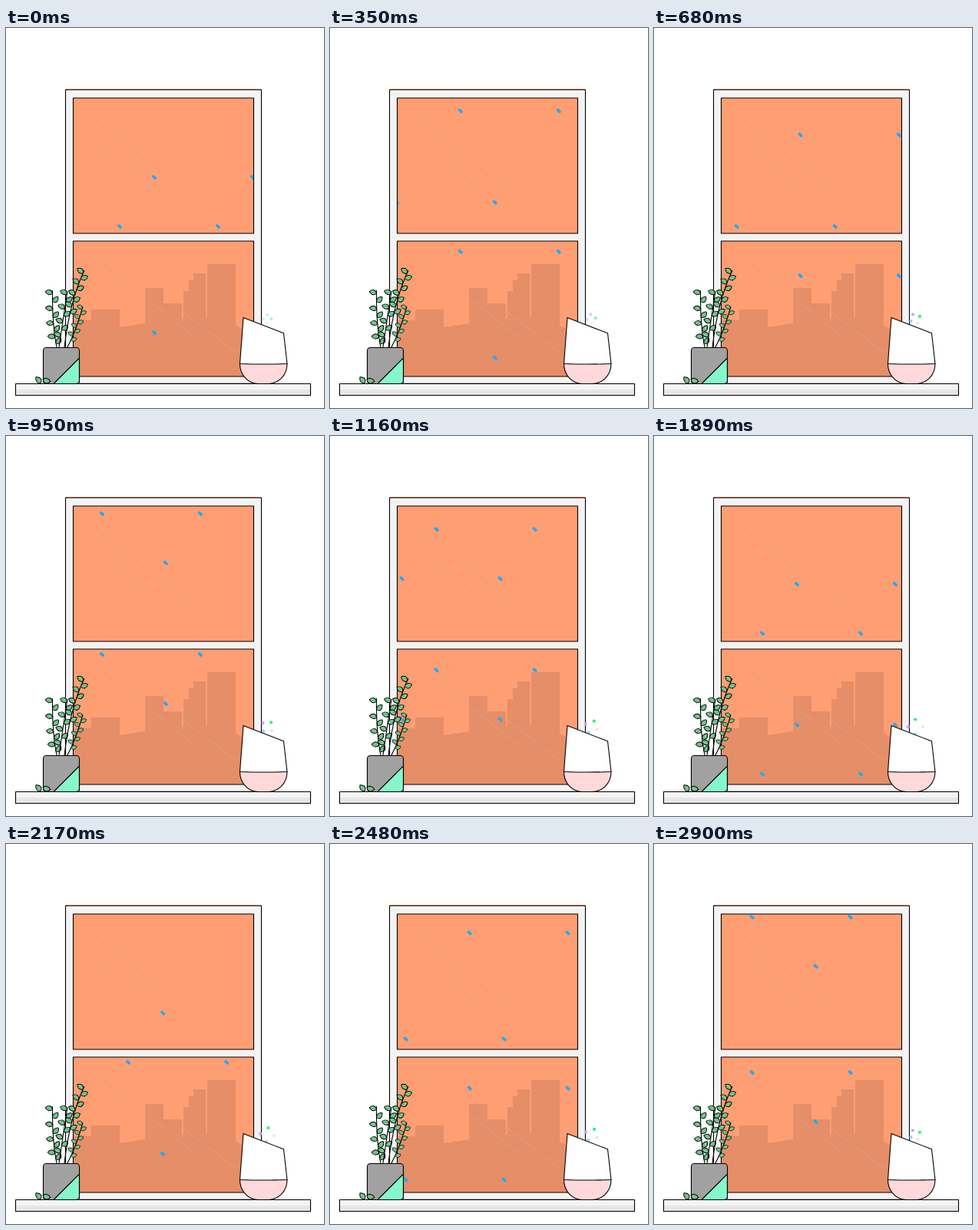
An HTML page that plays this animation: 414x494 px, repeating every 3 s.

```html
<!DOCTYPE html>
<html lang="en">
<head>
<meta charset="utf-8">
<title>Rainy window</title>
<style>
  html, body { margin: 0; width: 100%; height: 100%; overflow: hidden; background: #fff; }
  svg { display: block; width: 414px; height: 494px; }
  .line { stroke: #000; stroke-width: 1.1; stroke-linejoin: round; }
  .glass { fill: #ff9e73; }
  .hollow { fill: none; }
  .city { fill: #e58e68; }
  .shine { fill: none; stroke: #dca18d; stroke-width: 1; }
  .drop { stroke: #1eaaff; stroke-width: 3.7; stroke-linecap: round; }
  .stem { fill: none; stroke: #000; stroke-width: 1.1; }
  .leaf { fill: #72c58c; stroke: #000; stroke-width: 1; stroke-linejoin: round; }
</style>
</head>
<body>
<svg viewBox="0 0 414 494">
  <defs>
    <clipPath id="panes">
      <path d="M88 91.5H322.5V266.5H88ZM88 277.5H322.5V452.5H88Z"/>
    </clipPath>
    <path id="pane-shape" d="M87.5 91H322.5V267H87.5ZM87.5 277H322.5V453H87.5Z"/>
    <rect id="sill-shape" x="12.5" y="462.5" width="384" height="15"/>
    <rect id="pot-shape" x="48.5" y="415.5" width="47" height="47" rx="4"/>
  </defs>

  <rect class="glass" x="78" y="79" width="254" height="2"/>
  <rect class="line" x="77.5" y="80.2" width="255" height="382" fill="#f3f3f3"/>
  <use href="#pane-shape" class="glass"/>
  <path class="city" d="M88 453V380H111V366H148V389L181 384V338H205V358H229V378H231V342H238V328H244V319H260V376H262V307H299V387L322 398V453Z"/>
  <path class="shine" d="M114 118L248 224M123 152L192 206.500M113 297L247 403M228 367L299 422"/>
  <g clip-path="url(#panes)"><g id="rain"></g></g>
  <use href="#pane-shape" class="line hollow"/>

  <g id="mist"></g>

  <use href="#sill-shape" fill="#f4f4f4"/>
  <rect x="12.5" y="470" width="384" height="7.5" fill="#e6e6e6"/>
  <use href="#sill-shape" class="line hollow"/>

  <path class="line" fill="#ffd9d9" d="M304.500 436.500H366C366 452 354 462.500 341 462.500H329C316 462.500 304.500 452 304.500 436.500Z"/>
  <path class="line" fill="#fff" d="M309 376.500L361.500 396.800L366 436.500Q335 437.500 304.500 436.500Z"/>

  <g id="plant"></g>
  <use href="#pot-shape" fill="#a1a1a1"/>
  <path class="line" fill="#86f7cb" d="M95.500 429V459Q95.500 462.500 92 462.500H62Z"/>
  <use href="#pot-shape" class="line hollow"/>
  <g id="fallen"></g>
</svg>
<script>
const LOOP = 3000;
const TICK = 30;
const byId = id => document.getElementById(id);
const rain = byId('rain'), mist = byId('mist'), plant = byId('plant'), fallen = byId('fallen');

function add(parent, tag, attrs) {
  const el = document.createElementNS('http://www.w3.org/2000/svg', tag);
  for (const key in attrs) el.setAttribute(key, attrs[key]);
  return parent.appendChild(el);
}

function leaf(parent, x, y, angle, size = 1) {
  add(parent, 'path', {
    class: 'leaf',
    d: 'M0 0C2 -4 6 -5 10 -2C8 3 4 5 0 0Z',
    transform: `translate(${x} ${y}) rotate(${angle}) scale(${size})`
  });
}

// A bent stem with leaves on alternating sides up to its tip
function grow([x0, y0], [cx, cy], [x1, y1], count, size, bare = 0.08) {
  add(plant, 'path', { class: 'stem', d: `M${x0} ${y0}Q${cx} ${cy} ${x1} ${y1}` });
  for (let i = 0; i < count; i++) {
    const t = 0.95 - (0.95 - bare) * i / (count - 1), u = 1 - t;
    const x = u * u * x0 + 2 * u * t * cx + t * t * x1;
    const y = u * u * y0 + 2 * u * t * cy + t * t * y1;
    const dx = u * (cx - x0) + t * (x1 - cx);
    const dy = u * (cy - y0) + t * (y1 - cy);
    const side = i % 2 ? 62 : -62;
    leaf(plant, x, y, Math.atan2(dy, dx) * 180 / Math.PI + side, size);
  }
}
grow([66, 415], [60, 385], [60.5, 341], 8, 0.95);
grow([69, 415], [74, 380], [80, 342], 7, 0.95, 0.2);
grow([76, 415], [83, 355], [102, 315], 8, 0.95, 0.4);
grow([80, 415], [92, 392], [100, 362], 8, 0.75, 0.2);
leaf(fallen, 45, 462, 245);
leaf(fallen, 48, 457, 25);

// Drops fall in staggered pairs of rows, repeated every 128px across
for (let i = 0, top = -191; i < 4; top += i++ % 2 ? 183 : 202) {
  for (const [left, y] of [[65, top], [20, top + 64]]) {
    for (let x = left - 256; x < 400; x += 128) {
      add(rain, 'line', { class: 'drop', x1: x - 1.2, y1: y - 1.1, x2: x + 1.2, y2: y + 1.1 });
    }
  }
}

const dots = ['#22f57c', '#ffdcdc', '#8ed8ff', '#c9a2ff'].map(fill => add(mist, 'circle', { r: 2.1, fill }));

function draw(now) {
  const t = Math.max(0, Math.floor((now % LOOP + 10) / TICK) * TICK - 10);

  const fall = t * (0.0928 + 2e-6 * t);
  rain.setAttribute('transform', `translate(${fall * 2 / 3} ${fall})`);

  // Dots swing a quarter turn while spreading out and back
  const spread = (1 - Math.cos(Math.PI * t / 1800)) / 2;
  const radius = 5.2 + 4.3 * spread;
  dots.forEach((dot, i) => {
    const angle = (i - spread) * Math.PI / 2;
    dot.setAttribute('cx', 340.2 + radius * Math.cos(angle));
    dot.setAttribute('cy', 378 + radius * Math.sin(angle));
  });
  mist.setAttribute('opacity', Math.min(1, 0.4 + 2 * spread));
}

const start = performance.now();
function tick() {
  draw(performance.now() - start);
  requestAnimationFrame(tick);
}
tick();
</script>
</body>
</html>
```
